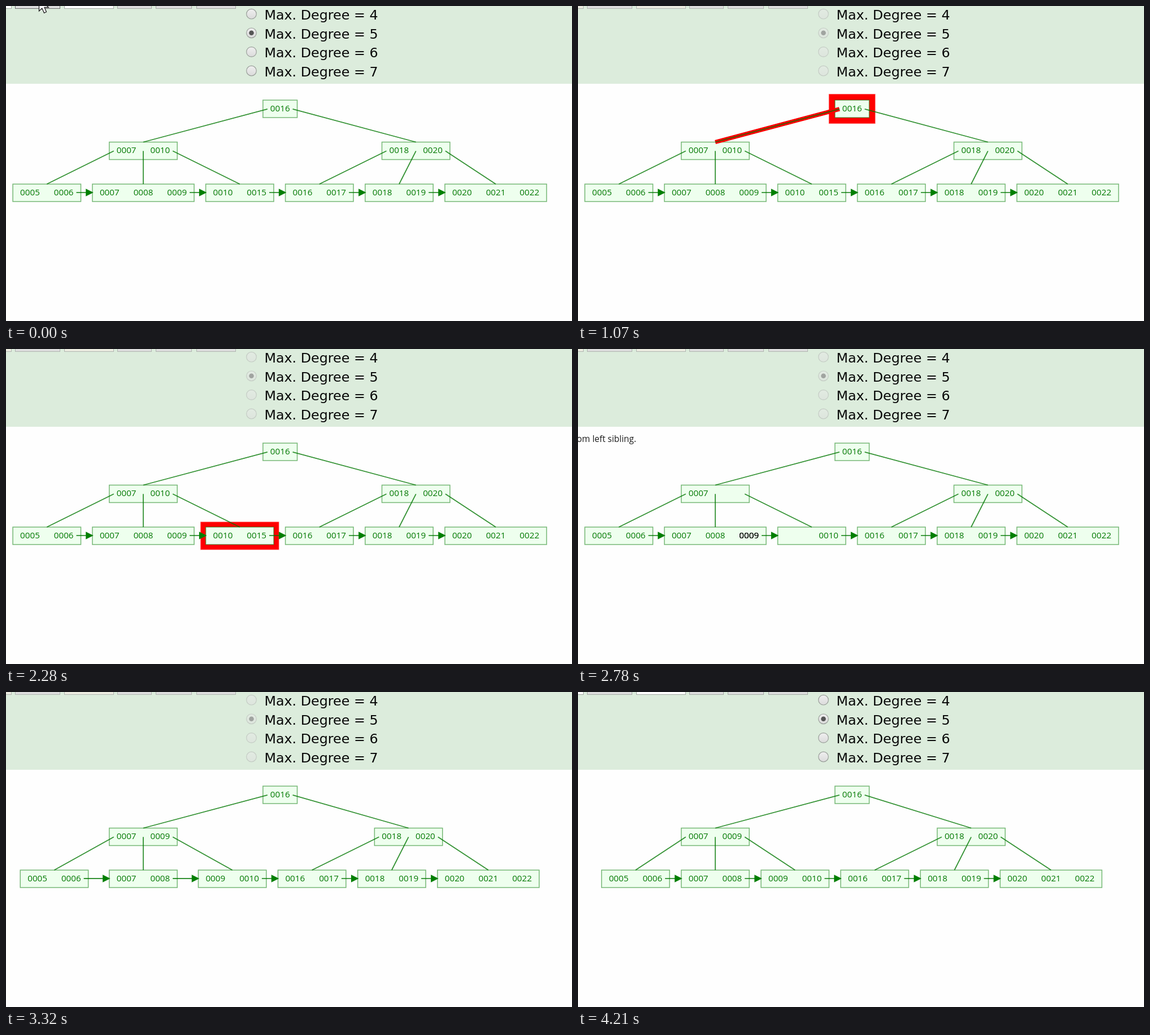
Animation of 1002x559 px, one loop 5.1 s. Source, as an HTML page with a canvas:

```html
<!DOCTYPE html>
<html lang="en">
<head>
<meta charset="utf-8">
<title>B+ tree deletion</title>
<style>
html, body { margin: 0; width: 100%; height: 100%; overflow: hidden; background: #fefefe; }
canvas { display: block; }
</style>
</head>
<body>
<canvas id="stage" width="1002" height="559"></canvas>
<script>
const ctx = document.getElementById('stage').getContext('2d');
const LOOP = 5100;
// Start of each step, in ms
const T = { root: 140, rootEdge: 670, node: 1190, nodeEdge: 1670, leaf: 2200, steal: 2770, resize: 3130, end: 3560 };
const KEY_W = 59.7, NODE_H = 31;
const ROWS = [182.5, 257, 331.5];
const GREEN = '#007700';
const EDGE = 'rgba(0,119,0,.8)';
const KEY_FONT = '15.2px "Open Sans", "Noto Sans", sans-serif';
const NOTE_FONT = '15.4px "Open Sans", "Noto Sans", sans-serif';

const clamp = v => Math.max(0, Math.min(1, v));
const mix = (a, b, p) => a + (b - a) * p;
const during = (t, a, b) => t >= a && t < b;

// Triangle wave shared by every highlight
function pulse(t) {
  const period = 1365, peak = 1150;
  const phase = (((t - peak) % period) + period) % period;
  return 4.5 + 6.5 * Math.abs(phase / period * 2 - 1);
}

function text(str, x, y, font, color, align = 'center') {
  ctx.font = font;
  ctx.fillStyle = color;
  ctx.textAlign = align;
  ctx.fillText(str, x, y);
}

function line(x1, y1, x2, y2, color, width) {
  ctx.strokeStyle = color;
  ctx.lineWidth = width;
  ctx.beginPath();
  ctx.moveTo(x1, y1);
  ctx.lineTo(x2, y2);
  ctx.stroke();
}

function makeNode(x, row, keys) {
  const w = keys.length * KEY_W + 1;
  return {
    x, y: ROWS[row], keys, w,
    left: x - w / 2, right: x + w / 2,
    top: ROWS[row] - NODE_H / 2, bottom: ROWS[row] + NODE_H / 2
  };
}

const keyX = (n, i) => n.x + (i - (n.keys.length - 1) / 2) * KEY_W;

function drawNode(n, glow) {
  if (glow) {
    const frame = [n.left - glow, n.top - glow, n.w + 2 * glow, NODE_H + 2 * glow];
    ctx.fillStyle = '#ff0000';
    ctx.fillRect(...frame);
    ctx.strokeStyle = 'rgba(255,0,0,.5)';
    ctx.lineWidth = 1.6;
    ctx.strokeRect(...frame);
  }
  ctx.fillStyle = '#eeffee';
  ctx.fillRect(n.left, n.top, n.w, NODE_H);
  ctx.strokeStyle = 'rgba(0,119,0,.52)';
  ctx.lineWidth = 1.5;
  ctx.strokeRect(n.left, n.top, n.w, NODE_H);
  n.keys.forEach((k, i) => text(k, keyX(n, i), n.y + 4.2, KEY_FONT, GREEN));
}

function drawEdge(parent, slot, child, glow) {
  const last = parent.keys.length;
  const x = slot === 0 ? parent.left + 8 : slot === last ? parent.right - 8 : parent.left + slot * KEY_W + .5;
  const pts = [x, parent.y + .3, child.x, child.top];
  if (glow) line(...pts, '#ff0000', 2.8 + glow * .45);
  line(...pts, EDGE, 1.8);
}

function drawArrow(from, to) {
  const y = from.y - .5, tip = to.left + 1.8;
  line(from.right - 8, y, tip - 8, y, EDGE, 1.8);
  ctx.fillStyle = '#007f00';
  ctx.beginPath();
  ctx.moveTo(tip, y);
  ctx.lineTo(tip - 13.5, y - 6.7);
  ctx.lineTo(tip - 13.5, y + 6.7);
  ctx.fill();
}

function buildTree(t) {
  const p = clamp((t - T.resize) / (T.end - T.resize));
  const stealing = during(t, T.steal, T.resize), done = t >= T.resize;
  const shift = 29.6 * p;
  const leaf = (x, ...keys) => makeNode(x, 2, keys);
  const mid = stealing ? '' : done ? '0009' : '0010';
  const third = stealing ? ['', '0010'] : done ? ['0009', '0010'] : ['0010', '0015'];
  const second = ['0007', '0008'];
  if (!done) second.push(stealing ? '' : '0009');
  return {
    root: makeNode(485.2, 0, ['0016']),
    inner: [makeNode(243, 1, ['0007', mid]), makeNode(725.7 - shift, 1, ['0018', '0020'])],
    leaves: [
      leaf(72.3 + shift, '0005', '0006'),
      leaf(243, ...second),
      leaf(413.8 - shift, ...third),
      leaf(554.8 - shift, '0016', '0017'),
      leaf(696 - shift, '0018', '0019'),
      leaf(867 - shift, '0020', '0021', '0022')
    ]
  };
}

function drawTree(t) {
  const { root, inner, leaves } = buildTree(t);
  const size = pulse(t);
  const glow = (a, b) => during(t, a, b) ? size : 0;

  leaves.forEach((n, i) => drawNode(n, i === 2 ? glow(T.leaf, T.steal) : 0));
  inner.forEach((n, i) => drawNode(n, i === 0 ? glow(T.node, T.leaf) : 0));
  drawNode(root, glow(T.root, T.node));

  inner.forEach((n, i) => {
    drawEdge(root, i, n, i === 0 ? glow(T.rootEdge, T.node) : 0);
    for (let s = 0; s < 3; s++) {
      drawEdge(n, s, leaves[i * 3 + s], i === 0 && s === 2 ? glow(T.nodeEdge, T.leaf) : 0);
    }
  });
  for (let i = 0; i < 5; i++) drawArrow(leaves[i], leaves[i + 1]);

  if (during(t, T.steal, T.resize)) {
    const p = clamp((t - T.steal - 30) / (T.resize - T.steal - 30));
    const from = leaves[1], x = keyX(from, 2);
    for (const [n, i] of [[inner[0], 1], [leaves[2], 0]]) {
      text('0009', mix(x, keyX(n, i), p), mix(from.y, n.y, p) + 4.2, KEY_FONT, '#000');
    }
    text('Stealing from left sibling.', 103, 164.8, NOTE_FONT, '#1c1c1c', 'right');
  }
}

function box(x, w, fill, border) {
  ctx.fillStyle = fill;
  ctx.fillRect(x, -5, w, 10);
  ctx.strokeStyle = border;
  ctx.lineWidth = 1;
  ctx.strokeRect(x + .5, -5.5, w - 1, 10);
}

function drawControls(off, hover) {
  ctx.fillStyle = '#dcecdc';
  ctx.fillRect(0, 0, 1002, 138);

  const field = off ? '#ebebe0' : '#ffffff';
  const border = off ? '#b0b5b0' : '#a3a8a3';
  box(-20, 30, field, border);
  box(103, 88, field, border);
  for (const [x, w] of [[16, 80], [197, 61], [265, 64], [337, 70]]) {
    box(x, w, '#dddddd', hover && x === 16 ? '#6e6e6e' : border);
  }

  for (let i = 0; i < 4; i++) {
    const y = 14.2 + i * 33.6;
    const fill = ctx.createLinearGradient(0, y - 9, 0, y + 9);
    fill.addColorStop(0, off ? '#e2ebe2' : '#f0f0f0');
    fill.addColorStop(1, off ? '#dde5dd' : '#dadada');
    ctx.beginPath();
    ctx.arc(434.5, y, 8.8, 0, 7);
    ctx.fillStyle = fill;
    ctx.fill();
    ctx.strokeStyle = off ? '#c4ccc4' : '#9a9f9a';
    ctx.lineWidth = 1.2;
    ctx.stroke();
    if (i === 1) {
      ctx.beginPath();
      ctx.arc(434.5, y, 4.3, 0, 7);
      ctx.fillStyle = off ? '#a0a4a0' : '#555';
      ctx.fill();
    }
    text('Max. Degree = ' + (4 + i), 457.4, 24 + i * 33.6, '23.8px "DejaVu Sans", sans-serif', '#080808', 'left');
  }
}

function drawCursor(x, y) {
  ctx.save();
  ctx.translate(x, y);
  ctx.beginPath();
  for (const [a, b] of [[0, 0], [0, 23], [5.3, 18], [9, 26.3], [13, 24.5], [9.5, 16.5], [16.8, 16.5]]) ctx.lineTo(a, b);
  ctx.closePath();
  ctx.fillStyle = '#fff';
  ctx.fill();
  ctx.strokeStyle = '#222';
  ctx.lineWidth = 1.3;
  ctx.stroke();
  ctx.restore();
}

function draw(t) {
  ctx.fillStyle = '#fefefe';
  ctx.fillRect(0, 0, 1002, 559);
  const hover = t < 240;
  drawControls(during(t, T.root, T.end), hover);
  drawTree(t);
  if (hover) drawCursor(58.5, -14);
  if (during(t, 4170, 4210)) drawCursor(120.5, 428.5);
}

const start = performance.now();
function tick() {
  draw((performance.now() - start) % LOOP);
  requestAnimationFrame(tick);
}
draw(0);
requestAnimationFrame(tick);
</script>
</body>
</html>
```
